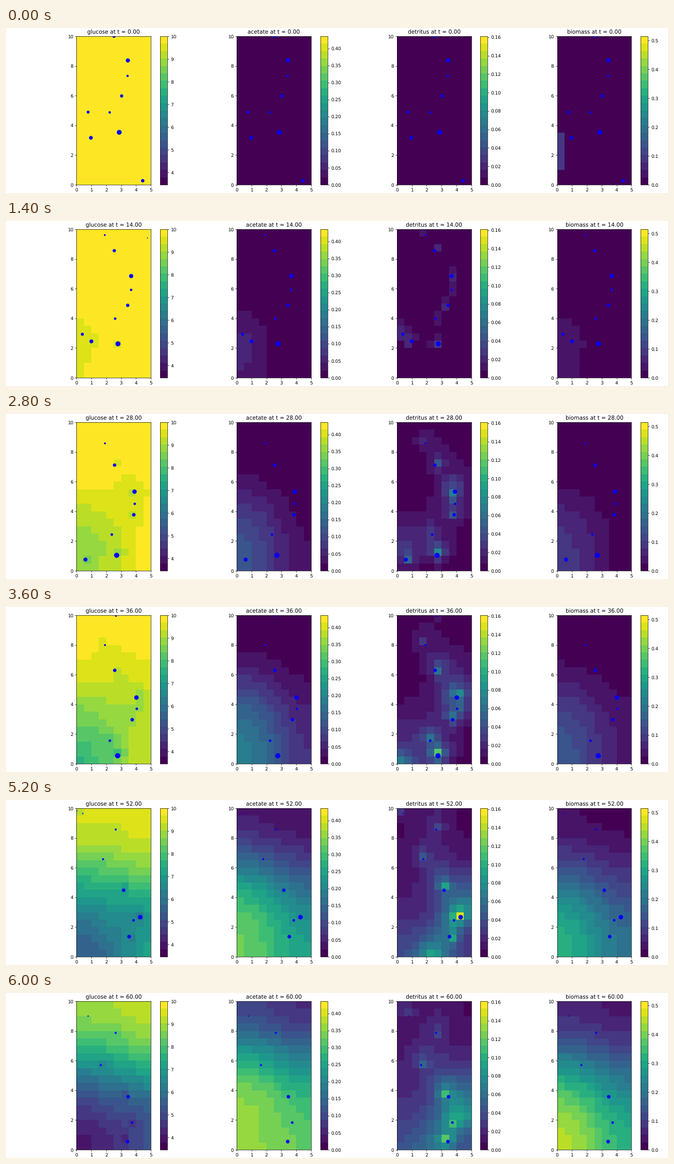
A matplotlib script for the animation above (6.1 s loop, 1280 by 320 pixels).

```python
import numpy as np
import matplotlib.pyplot as plt
from matplotlib.animation import FuncAnimation

W, H, DPI = 1280, 320, 64
FRAMES, INTERVAL = 61, 100
CELL, STEPS = 0.5, 4

# name: (vmin, vmax, colorbar tick spacing)
PANELS = {
    "glucose": (3.465, 10, 1),
    "acetate": (0, 0.436, 0.05),
    "detritus": (0, 0.161, 0.02),
    "biomass": (0, 0.5145, 0.1),
}

# Sinking beads: radius in px, then (t, x, y) way points
BEADS = [
    (3.1, (0, 2.52, 10), (36, 2.57, 6.29), (60, 3.47, 3.57)),
    (4.0, (0, 3.45, 8.37), (45, 4.17, 3.48), (56, 4.35, 2.2)),
    (2.3, (0, 3.43, 7.33), (36, 4.05, 3.7), (60, 3.73, 1.83)),
    (3.2, (0, 3.03, 5.98), (28, 3.85, 3.77), (60, 3.43, 0.55)),
    (2.9, (0, 0.78, 4.89), (21, 0.2, 1.95)),
    (2.4, (0, 2.23, 4.87), (14, 2.6, 3.98), (51, 2.0, -0.1)),
    (4.7, (0, 2.87, 3.53), (28, 2.7, 1.04), (47, 2.85, -0.15)),
    (3.7, (0, 0.97, 3.16), (14, 1.0, 2.45), (35, 0.4, -0.1)),
    (3.3, (0, 4.45, 0.27), (4, 4.45, -0.12)),
    (1.8, (8, 1.9, 10.05), (45, 1.92, 7.33), (60, 1.63, 5.7)),
    (1.0, (6, 4.3, 10.05), (18, 5.0, 9.1)),
    (1.9, (35, 2.65, 10.05), (60, 2.63, 7.87)),
    (1.2, (47, 0.2, 10.05), (60, 0.78, 9.0)),
    (0.9, (49, 0.3, 10.05), (53, -0.05, 9.75)),
]

# Rates of the reaction-diffusion model
SPREAD, LITTER_SPREAD = 0.09, 0.05
GROWTH, HALF = 0.253, 20
GLUCOSE_USE, ACETATE_YIELD, ACETATE_USE = 12, 1.65, 0.2
BEAD_RATE, DEATH, DECAY = 0.04, 0.0035, 0.03


def beads(t):
    """Rows of x, y, radius for every bead alive at time t."""
    alive = []
    for r, *way in BEADS:
        ts, xs, ys = zip(*way)
        if ts[0] <= t <= ts[-1]:
            alive.append((np.interp(t, ts, xs), np.interp(t, ts, ys),
                          r * (1 + 0.002 * (t - ts[0]))))
    return np.array(alive)


def bead_activity(t, shape):
    """Activity of the beads, put into the cell that holds each one."""
    rate = np.zeros(shape)
    for x, y, r in beads(t):
        row, col = int(y // CELL), int(x // CELL)
        if 0 <= row < shape[0] and 0 <= col < shape[1]:
            rate[row, col] += BEAD_RATE * (r / 3.5)**1.5 * min(t / 40, 1)
    return rate


def laplacian(f):
    p = np.pad(f, 1, mode="edge")
    return (p[2:, 1:-1] + p[:-2, 1:-1] + p[1:-1, 2:] + p[1:-1, :-2]
            - 4 * f) / CELL**2


def simulate():
    """Fields of all panels, one dict per unit of time."""
    shape = int(10 / CELL), int(5 / CELL)
    glu, ace, det, bio = np.full(shape, 10.0), *np.zeros((3, *shape))
    bio[2:7, 0] = 0.1
    dt, states = 1 / STEPS, []
    for n in range(FRAMES * STEPS):
        if n % STEPS == 0:
            states.append(dict(glucose=glu, acetate=ace,
                               detritus=det, biomass=bio))
        grown = GROWTH * bio * glu / (HALF + glu)
        active = bead_activity(n * dt, shape)
        d_glu = SPREAD * laplacian(glu) - GLUCOSE_USE * (grown + active)
        d_ace = (SPREAD * laplacian(ace) + ACETATE_YIELD * grown
                 - ACETATE_USE * bio * ace)
        d_det = (LITTER_SPREAD * laplacian(det) + active
                 + DEATH * bio - DECAY * det)
        d_bio = SPREAD * laplacian(bio) + grown
        glu, ace = glu + dt * d_glu, ace + dt * d_ace
        det, bio = det + dt * d_det, bio + dt * d_bio
    return states


def place(fig, left, width):
    return fig.add_axes([left / W, 16 / H, width / W, 288 / H])


plt.rcParams.update({"font.family": "DejaVu Sans", "text.hinting": "none"})
fig = plt.figure(figsize=(W / DPI, H / DPI), dpi=DPI, facecolor="white")
cmap = plt.get_cmap("viridis", 20)
states = simulate()
parts = {}
for i, (name, (lo, hi, gap)) in enumerate(PANELS.items()):
    left = 136.3 + 309.75 * i
    ax = place(fig, left, 143.9)
    mesh = ax.pcolormesh(np.arange(0, 5.1, CELL), np.arange(0, 10.1, CELL),
                         states[0][name], cmap=cmap, vmin=lo, vmax=hi)
    dots = ax.scatter([], [], c="blue", linewidths=0, zorder=2)
    ax.set(xlim=(0, 5), ylim=(0, 10), xticks=range(6), yticks=range(0, 11, 2))
    ticks = gap * np.arange(np.ceil(lo / gap), np.floor(hi / gap) + 1)
    fig.colorbar(mesh, cax=place(fig, left + 161.6, 14.05), ticks=ticks)
    parts[name] = mesh, dots, ax.set_title("")


def draw(t):
    pts = beads(t)
    for name, (mesh, dots, title) in parts.items():
        mesh.set_array(states[t][name])
        dots.set_offsets(pts[:, :2])
        dots.set_sizes((2 * pts[:, 2] * 72 / DPI)**2)
        title.set_text(f"{name} at t = {t:.2f}")
    return []


anim = FuncAnimation(fig, draw, frames=FRAMES, interval=INTERVAL,
                     init_func=lambda: draw(0), repeat=True, repeat_delay=0)
plt.show()
```
